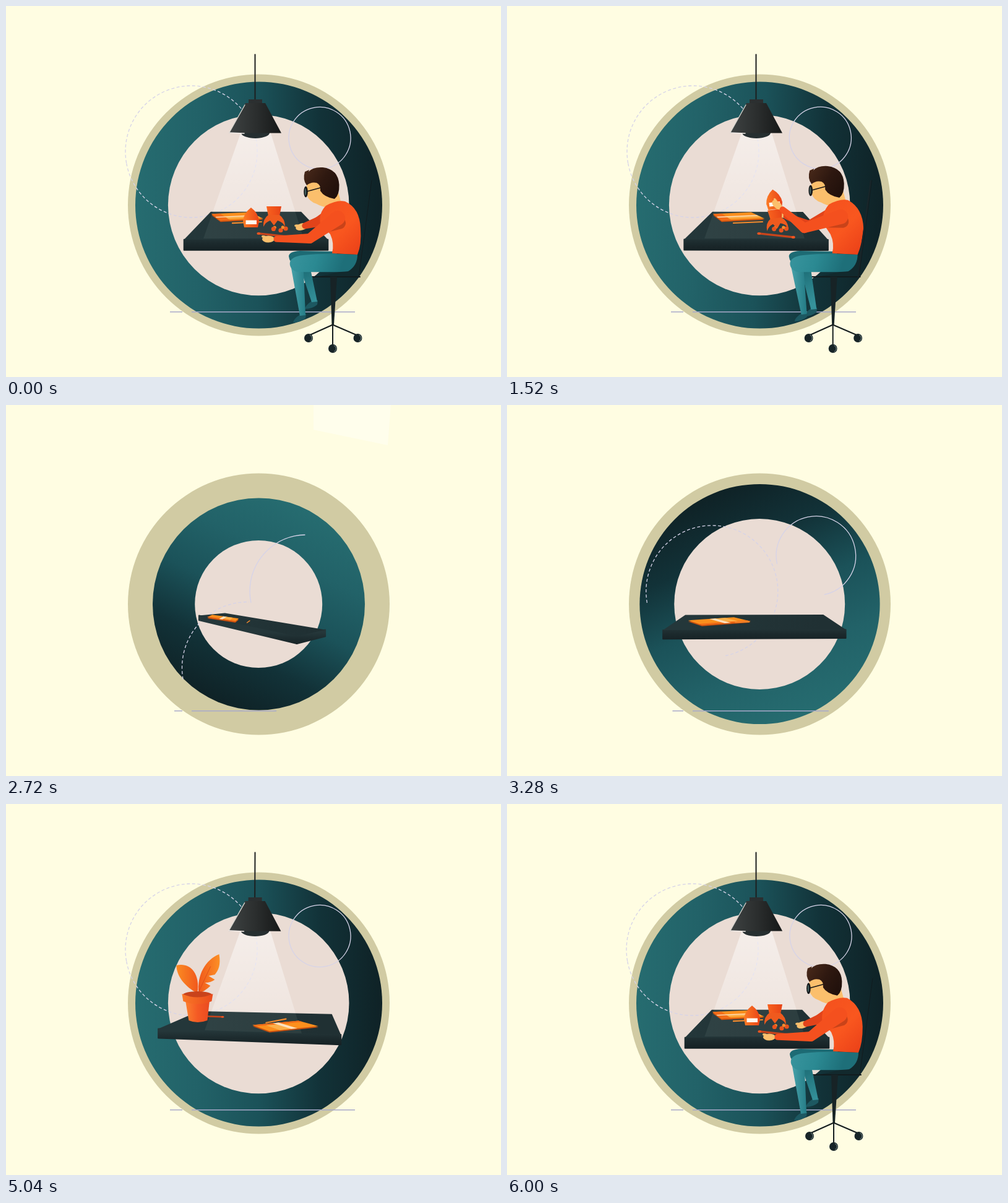
These frames come from a looping animation (800 px wide and 600 px high, 6040 ms). An HTML page with a canvas:

```html
<!DOCTYPE html>
<html lang="en">
<head>
<meta charset="utf-8">
<title>Workbench</title>
<style>
html, body { margin: 0; width: 100%; height: 100%; overflow: hidden; background: #fffde2; }
canvas { display: block; }
</style>
</head>
<body>
<canvas id="stage" width="800" height="600"></canvas>
<script>
const c = document.getElementById('stage').getContext('2d');
const LOOP = 6040, CX = 408.5, CY = 322, RAD = Math.PI / 180;
const lerp = (a, b, p) => a + (b - a) * p;
const mix = (a, b, p) => a.map((v, i) => lerp(v, b[i], p));

// Eased 0 to 1 between two times.
function ramp(t, from, to) {
  const p = Math.min(Math.max((t - from) / (to - from), 0), 1);
  return p * p * (3 - 2 * p);
}
const pulse = (t, a, b, d) => ramp(t, a, b) - ramp(t, b, d);
const gap = (t, a, b, d, e) => 1 - ramp(t, a, b) + ramp(t, d, e);

// Smooth curve through [time, value] points.
function curve(t, ...ks) {
  const n = ks.length - 1;
  if (t <= ks[0][0]) return ks[0][1];
  if (t >= ks[n][0]) return ks[n][1];
  let i = 0;
  while (t > ks[i + 1][0]) i++;
  const slope = j => (ks[j + 1][1] - ks[j][1]) / (ks[j + 1][0] - ks[j][0]);
  const tan = j => {
    if (j === 0 || j === n) return 0;
    const a = slope(j - 1), b = slope(j);
    return a * b <= 0 ? 0 : 2 * a * b / (a + b);
  };
  const h = ks[i + 1][0] - ks[i][0], p = (t - ks[i][0]) / h, q = 1 - p;
  return ks[i][1] * (1 + 2 * p) * q * q + ks[i + 1][1] * p * p * (3 - 2 * p) +
    h * (tan(i) * p * q * q - tan(i + 1) * p * p * q);
}

function fill(style, path) {
  c.fillStyle = style;
  c.fill(typeof path === 'string' ? new Path2D(path) : path);
}
function poly(pts) {
  const p = new Path2D();
  pts.forEach(([x, y]) => p.lineTo(x, y));
  p.closePath();
  return p;
}
function disc(x, y, rx, style, ry = rx, rot = 0) {
  c.beginPath();
  c.ellipse(x, y, Math.max(rx, 0), Math.max(ry, 0), rot, 0, 7);
  c.fillStyle = style;
  c.fill();
}
function line(a, b, w, style) {
  c.beginPath();
  c.moveTo(...a);
  c.lineTo(...b);
  c.lineWidth = w;
  c.strokeStyle = style;
  c.stroke();
}
function grad(x0, y0, x1, y1, ...cols) {
  const g = c.createLinearGradient(x0, y0, x1, y1);
  cols.forEach((col, i) => g.addColorStop(i / (cols.length - 1), col));
  return g;
}
function limb(a, b, ra, rb, style) {
  const ang = Math.atan2(b[1] - a[1], b[0] - a[0]);
  c.beginPath();
  c.arc(...a, ra, ang + Math.PI / 2, ang - Math.PI / 2);
  c.arc(...b, rb, ang - Math.PI / 2, ang + Math.PI / 2);
  c.closePath();
  c.fillStyle = style;
  c.fill();
}
function group(fn, x, y, scale = 1, rot = 0) {
  c.save();
  c.translate(x, y);
  c.rotate(rot);
  c.scale(scale, scale);
  fn();
  c.restore();
}

function rings(t) {
  const squeeze = pulse(t, 2250, 2720, 3500);
  const ang = curve(t, [1400, 0], [2080, 58], [2720, 116], [4000, 380], [4700, 360]) * RAD;
  const r = lerp(199.5, 171.5, squeeze);
  const dx = Math.cos(ang) * r, dy = Math.sin(ang) * r;
  disc(CX, CY, 211.5, '#d1cba3');
  disc(CX, CY, r, grad(CX - dx, CY - dy, CX + dx, CY + dy,
    '#266c70', '#226268', '#1b5259', '#123238', '#0f2226'));
  disc(CX - .3, CY, lerp(146.3, 103, squeeze), '#eadcd4');
}

function outlines(t) {
  const turn = pulse(t, 1400, 2080, 2400);
  const away = pulse(t, 2200, 2720, 3650);
  c.lineCap = 'butt';
  const arc = (home, nudge, far, r, from, dash) => {
    const [x, y] = mix(mix(home, nudge, turn), far, away);
    c.beginPath();
    c.arc(x, y, r, from * RAD, (from + lerp(360, 101, away)) * RAD);
    c.setLineDash(dash);
    c.lineWidth = 1.3;
    c.strokeStyle = '#d6d3e8';
    c.stroke();
    c.setLineDash([]);
  };
  arc([299.5, 235.5], [311, 235.5], [391, 425], 106.5, 170, [5, 3.5]);
  arc([507, 213.5], [499, 210], [485, 301], lerp(50, 91, away), 168, []);
  line([lerp(265, 272, away), 494.7], [285, 494.7], 1.5, '#a8a9ca');
  line([300, 494.7], [lerp(564, 437, away), 494.7], 1.5, '#a8a9ca');
}

const conePath = poly([[379, 206], [428, 206], [481, 376], [319, 376]]);
function inLamp(t, fn) {
  const p = gap(t, 2180, 2540, 3280, 3720);
  if (p < .01) return;
  const d = t - 4000;
  const swing = t > 3200 ? 4.5 * Math.exp(-Math.max(d, -400) / 500) * Math.cos(d / 200) : 0;
  c.save();
  c.translate(402.5, 79);
  c.rotate(swing * RAD);
  c.scale(p, p);
  c.translate(-402.5, -79);
  fn();
  c.restore();
}
function lamp() {
  line([402.5, 78.5], [402.5, 153], 2, '#1d1f1f');
  disc(403, 205, 23, '#262f31', 9);
  fill('#2b2f30', 'M392 151H414V158H392Z');
  fill(grad(366, 0, 442, 0, '#3c4040', '#2b2e2e', '#171919'),
    'M387 157H419L445 205.500H360.500Z');
  line([361, 204.5], [386, 160], 1.3, '#d8d6d0');
  line([361, 205], [385, 206], 1.5, '#f5efeb');
}

function makeTable(t) {
  const th = curve(t, [1400, 0], [2080, -7], [2720, 42], [4000, 158], [5040, 261], [5880, 360]) * RAD;
  const q = pulse(t, 2150, 2720, 3550);
  const W = lerp(1, .48, q), D = lerp(1, 1.42, q), k = lerp(1, .72, q);
  // Table coordinates to screen; the third value is the local scale.
  return (a, b) => {
    const x = a * W, y = b * D;
    const u = x * Math.cos(th) - y * Math.sin(th) - .165 * q;
    const z = x * Math.sin(th) + y * Math.cos(th) + .2 * q;
    const s = 1 / (.00557 + z / 551);
    return [404 + u * s * k + 12 * q, 350 + (.519 * s - 93) * k + 4 * q, s * k];
  };
}
function slab(at, t) {
  const top = [[-1, -1], [1, -1], [1, 1], [-1, 1]].map(([a, b]) => at(a * .5, b * .7));
  c.lineJoin = 'round';
  top.forEach((p, i) => {
    const n = top[(i + 1) % 4];
    if (n[0] <= p[0]) return;
    const face = poly([p, n, [n[0], n[1] + .073 * n[2]], [p[0], p[1] + .073 * p[2]]]);
    const y = Math.max(p[1], n[1]);
    const g = grad(0, y - 6, 0, y + 18, '#25373a', '#1c2a2d', '#152023');
    fill(g, face);
    c.strokeStyle = g;
    c.lineWidth = 2;
    c.stroke(face);
  });
  const plane = poly(top);
  fill(grad(300, 330, 500, 385, '#24373a', '#203033'), plane);
  c.save();
  c.clip(plane);
  inLamp(t, () => fill('rgba(190,225,215,.07)', conePath));
  c.restore();
}
function rod(at, a, b, w, col) {
  const ends = [at(...a), at(...b)];
  c.lineCap = 'round';
  line(ends[0], ends[1], w * (ends[0][2] + ends[1][2]) / 400, col);
  return ends;
}
function deskItems(at, t) {
  const m = ramp(t, 2750, 3700) - ramp(t, 5040, 5800);
  const mid = mix([-.2, .38], [.206, .277], m);
  const half = lerp(.21, .145, m), len = .23, tilt = lerp(108, 126, m) * RAD;
  const cos = Math.cos(tilt), sin = Math.sin(tilt);
  const pt = (l, w) => at(mid[0] + cos * l * len - sin * w * half, mid[1] + sin * l * len + cos * w * half);
  const strip = (style, l0, l1, w0, w1) =>
    fill(style, poly([pt(l0, w0), pt(l1, w0), pt(l1, w1), pt(l0, w1)]));
  group(() => strip('#c9500f', -1, 1, -1, 1), 0, 2);
  strip('#fb8f1d', -1, 1, -1, 1);
  strip('#f26c18', -1, 1, .55, 1);
  strip('#fbb04a', -.6, -.1, -1, .55);
  strip('#fde0bd', -.15, .1, -1, 1);
  rod(at, mix([-.21, -.03], [.098, .104], m), mix([.05, .04], [-.127, .261], m), 2.4, '#f58a2c');

  c.save();
  c.globalAlpha = gap(t, 2200, 2520, 4600, 4950);
  rod(at, mix([.02, -.49], [-.17, -.523], m), mix([.267, -.62], [-.157, -.349], m), 3, '#c8441b')
    .forEach(([x, y, s]) => disc(x, y, s / 75, '#ee5521', s / 110));
  c.restore();

  const bits = gap(t, 2200, 2520, 5500, 5780);
  for (let i = 0; i < 5; i++) {
    const [x, y] = at(.19 + .05 * Math.cos(i * 2.4), -.32 + .07 * Math.sin(i * 2.4));
    disc(x, y - 1, (3.6 - i % 2) * bits, i % 2 ? '#f98b2b' : '#e9521c');
  }
}

function plant(at, t) {
  const g = ramp(t, 3350, 3850) - ramp(t, 5120, 5560);
  if (g < .01) return;
  const drift = ramp(t, 4000, 5040), a = lerp(-59, -74.5, drift) * RAD;
  const [x, y, s] = at(.52 * Math.cos(a), .52 * Math.sin(a));
  group(() => {
    group(() => {
      fill(grad(-34, 0, 5, 0, '#fb8a22', '#f0531c'),
        'M0 0C-20-10-34-28-34-45C-15-50 5-36 0 0Z');
      fill(grad(0, 0, 36, 0, '#f0561a', '#fc9026'),
        'M2 0C-1-30 13-54 35-63C38-46 34-37 28-30L18-28L28-22Q22-17 12-17L21-12Q12-3 2 0Z');
      c.lineCap = 'round';
      line([1, 0], [21, -43], .8, '#d8441a');
    }, 0, -46, 1, 9 * (1 - drift) * RAD);
    disc(0, -43, 24, '#c9431b', 6);
    fill(grad(-20, 0, 20, 0, '#fb812f', '#f45a24', '#e94a20'),
      'M-20-38H20L16-2Q0 4-14-2Z');
    fill(grad(-25, 0, 25, 0, '#f97827', '#ea4b1c'),
      'M-25-45Q0-34 25-45L23-33Q0-24-23-33Z');
  }, x, y, g * s / 183);
}

function rocketNose() {
  fill(grad(-12, 0, 12, 0, '#fb7a25', '#ea4618'),
    'M0 0Q12 9 13 22L11 32H-11L-13 22Q-12 9 0 0Z');
  fill('#fff8ef', 'M-8.5 20.5H9V27H-8.5Z');
}
function rocketTail() {
  fill(grad(-13, 0, 13, 0, '#f9641f', '#e64317'), 'M-12 0H12L9 16L8 22H-8L-9 16Z');
  fill('#ef5a1e', 'M-9 14Q-18 20-17 33Q-13 25-6 23L0 31L6 23Q14 25 18 33Q18 20 9 14Z');
}

const SKIN = '#fbbf6c';
function arm(sh, el, ha, r, style) {
  const a = Math.atan2(ha[1] - el[1], ha[0] - el[0]);
  disc(ha[0], ha[1], 10, SKIN, 5.5, a);
  disc(ha[0] + Math.cos(a + .5) * 8, ha[1] + Math.sin(a + .5) * 8, 4, SKIN, 2, a + .3);
  limb(sh, el, r, 8, style);
  limb(el, mix(el, ha, .8), 8, 5, style);
}

function chair() {
  fill('#12292d', 'M493 438Q550 436 566 402L573 404L571 439Z');
  line([474, 438], [572, 438], 2, '#121c1e');
  fill('#172326', 'M524 438H535L530 515H526.5Z');
  for (const [x, y] of [[489, 537], [568.5, 537], [528, 554]]) {
    line([528, 515.5], [x, y - 4], 2, '#151d1f');
    disc(x, y, 7, '#172427');
    c.beginPath();
    c.arc(x, y, 5.4, -1.1, 1.1);
    c.lineWidth = 1;
    c.strokeStyle = '#819493';
    c.stroke();
  }
}
// The back is edge-on until the chair turns.
function chairBack(turn) {
  const top = [591, 282], low = [570, 439];
  fill('#18262a', poly([mix(top, [557, 281], turn), top, low, mix(low, [544, 438], turn), mix([574, 400], [549, 400], turn)]));
  line(top, low, 1, '#101c1f');
}

function leg(knee, w, [x, y], style) {
  fill('#1d5861', `M${x - 4} ${y - 4}L${x + 6} ${y - 5}L${x + 5} ${y + 2}` +
    `Q${x - 3} ${y + 9} ${x - 15} ${y + 9}Q${x - 15} ${y + 4} ${x - 4} ${y - 4}Z`);
  fill(style, poly([knee, [knee[0] + w, knee[1] + 5], [x + 5, y - 3], [x - 4, y - 2]]));
}
function legs(far, near) {
  leg([476, 425], 17, far, grad(480, 430, 500, 480, '#1f7079', '#35929b'));
  fill('#1d6b74', 'M457 405Q457 397 475 396L532 397L540 408L470 420Q458 416 457 405Z');
  leg([461, 424], 20, near, grad(462, 0, 486, 0, '#45a0a8', '#237a84'));
  fill(grad(460, 402, 540, 430, '#38949d', '#2b8992', '#1e6f79'),
    'M568 402Q568 420 553 429Q545 431 470 430Q457 425 459 414Q462 405 480 403Q515 399 568 402Z');
}

function head() {
  fill(SKIN, 'M486 284L485.5 304Q489 316 502 320Q510 325 522 326L541 316L532 283Z');
  fill(grad(485, 265, 538, 300, '#472819', '#2e1810', '#20100b'),
    'M486 290Q479 281 483 268L490 265L489 268Q496 260 512 261Q537 264 538.5 289Q539 306 531 312' +
    'Q514 309 508 299Q509 289 502 286Q493 284 486 290Z');
  line([486, 300], [508, 294], 1.5, '#171717');
  disc(484.5, 300.5, 3.3, '#15181a', 9);
  disc(484, 300.5, 1.2, '#43605f', 6);
}

const POSES = {
  work: { lean: [0, 0], hand: [424, 377], elbow: [491, 376], farHand: [478, 357], sag: [5],
    nose: [396, 326], tail: [433, 324], foot: [479, 503], farFoot: [498, 481] },
  lift: { lean: [8, -2], hand: [437, 320], elbow: [482, 358], farHand: [440, 334], sag: [24],
    nose: [429, 297], tail: [433, 330], foot: [481, 501], farFoot: [496, 493] },
  show: { lean: [3, -3], hand: [449, 341], elbow: [481, 372], farHand: [483, 359], sag: [8],
    nose: [448, 294], tail: [448, 320], foot: [481, 501], farFoot: [504, 492] }
};
function blend(a, b, p) {
  const out = {};
  for (const k in a) out[k] = mix(a[k], b[k], p);
  return out;
}

function worker(t) {
  const size = gap(t, 2140, 2540, 5180, 5740);
  if (size < .01) return;
  const u = t > LOOP / 2 ? t - LOOP : t;
  const lift = ramp(u, 60, 800), show = ramp(u, 1400, 2080);
  const p = blend(blend(POSES.work, POSES.lift, lift), POSES.show, show);
  const settle = u < 0 ? 1 - ramp(u, -60, 0) : 0;
  const lx = p.lean[0] + 4 * settle, ly = p.lean[1] - 3 * settle;
  const tip = -8 * lift * (1 - show) * RAD;

  c.save();
  c.translate(440 - 16 * show, 400);
  c.scale(size, size);
  c.translate(-440, -400);
  c.lineCap = 'round';
  chair();
  if (show < .05) chairBack(show);
  const farSh = [531 + lx * .6, 331 + ly], mid = mix(p.farHand, farSh, .5);
  arm(farSh, [mid[0], mid[1] + p.sag[0]], p.farHand, 9, '#e2431a');
  group(rocketTail, ...p.tail, 1, tip);
  group(rocketNose, ...p.nose, 1, tip);
  legs(p.farFoot, p.foot);
  group(head, lx, ly);
  const x = v => v + lx * .6;
  fill(grad(515, 330, 575, 390, '#f5521e', '#f9571f', '#ec4319'),
    `M${x(517)} ${323 + ly}Q${x(535)} ${313 + ly} ${x(548)} ${316 + ly}Q${x(572)} 327 ${x(573)} 360` +
    `Q575 386 568 402L527 400Q531 384 524 369L${x(508)} 352Q${x(505)} 335 ${x(517)} ${323 + ly}Z`);
  const sh = [x(536), 343 + ly], shade = mix(sh, p.elbow, .4);
  limb([sh[0] + 3, sh[1] + 8], [shade[0], shade[1] + 5], 10, 5, 'rgba(110,30,15,.34)');
  arm(sh, p.elbow, p.hand, 12, '#f4501e');
  if (show >= .05) chairBack(show);
  c.restore();
}

function draw(t) {
  c.fillStyle = '#fffde2';
  c.fillRect(0, 0, 800, 600);
  fill(`rgba(255,255,255,${.35 * pulse(t, 2600, 2720, 2840)})`, 'M497 0H622L617 65L497 40Z');
  rings(t);
  outlines(t);
  inLamp(t, () => fill(grad(0, 206, 0, 376, 'rgba(255,255,255,.5)', 'rgba(255,255,255,.2)'), conePath));
  const at = makeTable(t);
  slab(at, t);
  deskItems(at, t);
  plant(at, t);
  inLamp(t, lamp);
  worker(t);
}

const start = performance.now();
function frame() {
  draw((performance.now() - start) % LOOP);
  requestAnimationFrame(frame);
}
frame();
</script>
</body>
</html>
```
